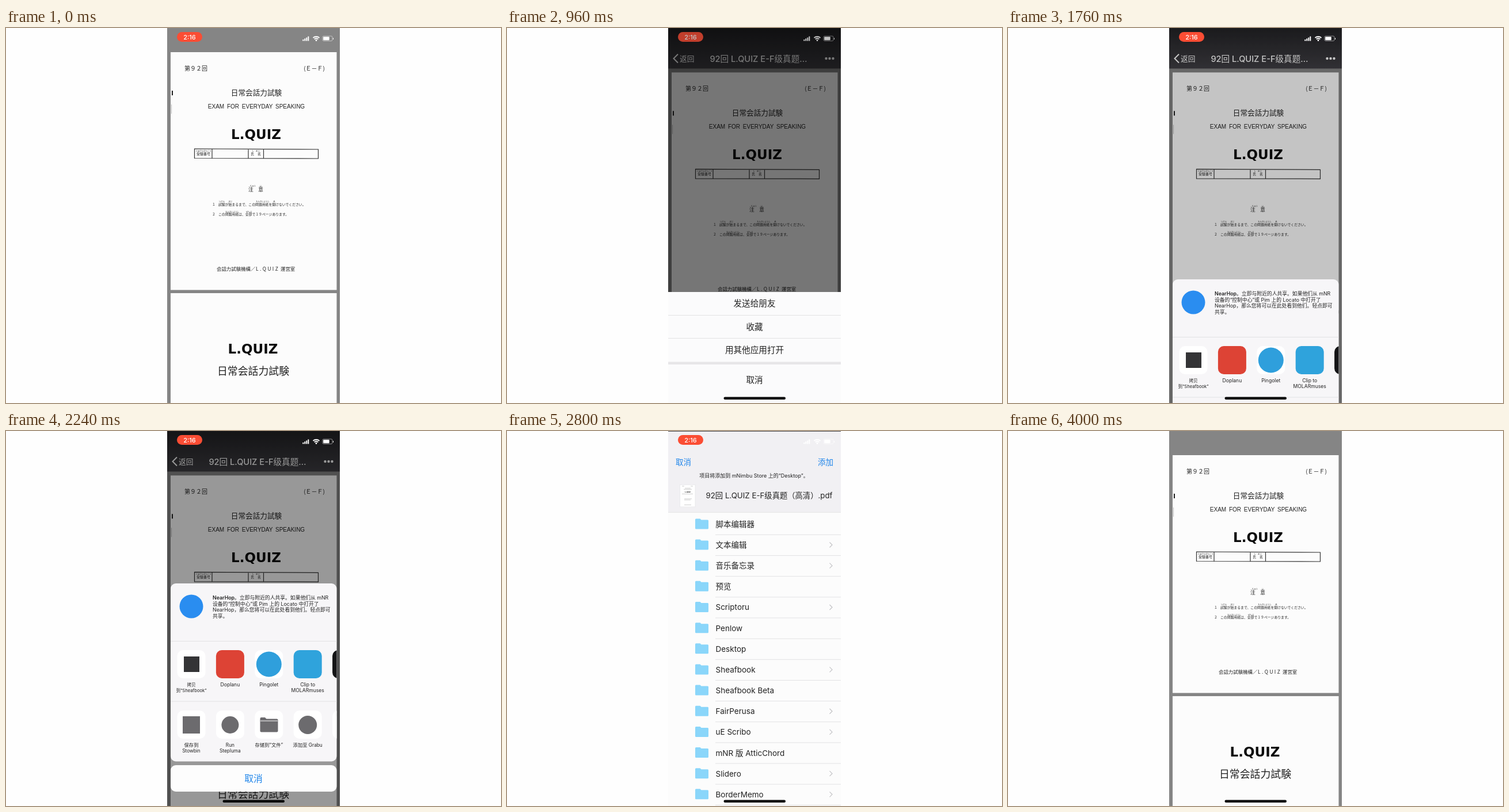
Recreate the animation shown at these times as an HTML page. Size 860x652 px, loop 4080 ms.

```html
<!DOCTYPE html>
<html lang="zh-CN">
<head>
<meta charset="utf-8">
<title>Saving a document</title>
<style>
  html, body { margin: 0; width: 100%; height: 100%; overflow: hidden; background: #fefefe; }
  svg { display: block; font-family: Inter, "Noto Sans CJK SC", "Noto Sans CJK", sans-serif; fill: #222; }
  .jp { font-family: "Noto Sans CJK JP", "Noto Sans CJK", sans-serif; }
  .arial { font-family: "Liberation Sans", sans-serif; word-spacing: 2px; }
  .bold { font-family: "DejaVu Sans", sans-serif; font-weight: bold; fill: #0c0c0c; }
  .mid { text-anchor: middle; }
  .white { fill: #fff; }
  .blue { fill: #1f85ea; }
  .line { stroke: #e2e2e4; stroke-width: 1; }
  .stroke { fill: none; stroke-width: 1.2; }
</style>
</head>
<body>
<svg id="stage" width="860" height="652" viewBox="0 0 860 652">
  <defs>
    <clipPath id="screen"><rect x="280" width="300" height="652"/></clipPath>
    <clipPath id="card"><rect x="286" y="265" width="288.5" height="309.5" rx="9"/></clipPath>
    <linearGradient id="bar" x2="0" y2="1">
      <stop stop-color="#222225"/><stop offset="1" stop-color="#3f3e43"/>
    </linearGradient>
  </defs>
  <g clip-path="url(#screen)">
    <rect x="279" width="302" height="652" fill="#858585"/>
    <g id="doc"></g>
    <g id="nav"></g>
    <rect id="dim" x="279" width="302" height="652" fill="#000"/>
    <g id="menu"></g>
    <g id="share"></g>
    <g id="files"></g>
    <g id="status"></g>
    <rect id="home" x="376.5" y="641.5" width="107.5" height="4.5" rx="2.2" fill="#050505"/>
  </g>
</svg>
<script>
const $ = id => document.getElementById(id);
const text = (x, y, size, str, cls = '', more = '') =>
  `<text x="${x}" y="${y}" font-size="${size}" class="${cls}" ${more}>${str}</text>`;
const rect = (x, y, w, h, fill, rx = 0, more = '') =>
  `<rect x="${x}" y="${y}" width="${w}" height="${h}" fill="${fill}" rx="${rx}" ${more}/>`;
const circle = (x, y, r, fill) => `<circle cx="${x}" cy="${y}" r="${r}" fill="${fill}"/>`;
const line = (x1, y, x2) => `<path class="line" d="M${x1} ${y}H${x2}"/>`;
const path = (d, stroke, more = '') => `<path class="stroke" d="${d}" stroke="${stroke}" ${more}/>`;

function drawDoc() {
  const ruby = [[343, 215, 'じゅけんばんごう'], [434, 215, 'し　めい'], [434, 275.5, 'ちゅう　　い'],
    [375, 303, 'しけん'], [390, 303, 'はじ'], [446, 303, 'もんだいようし'], [466, 303, 'あ'],
    [393, 320.5, 'もんだいようし'], [422, 320.5, 'ぜんぶ']];
  $('doc').innerHTML =
    rect(286, 42, 288.5, 413.5, '#fcfcfc') + rect(286, 461, 288.5, 420, '#fcfcfc') +
    rect(288, 109, 2, 8, '#222') + rect(287, 133, 1, 16, '#bbb') +
    text(310, 73.5, 10, '第９２回', 'jp') +
    text(554, 73.5, 10, '(Ｅ－Ｆ)', 'jp', 'text-anchor="end"') +
    text(435, 116.5, 12.65, '日常会話力試験', 'jp mid') +
    text(435, 139.5, 10, 'EXAM FOR EVERYDAY SPEAKING', 'arial mid') +
    text(434.5, 193, 23, 'L.QUIZ', 'bold mid') +
    path('M327.5 210L542.5 211V227L327.5 226.5ZM358 210V226.5M421 210.5V227M447.5 210.5V227', '#333') +
    text(343, 221, 6, '受験番号', 'jp mid') +
    text(434, 221, 6, '氏　名', 'jp mid') +
    text(434, 284, 8.7, '注　意', 'jp mid') +
    text(358, 308.5, 5.85, '１') + text(369, 308.5, 5.85, '試験が始まるまで、この問題用紙を開けないでください。', 'jp') +
    text(358, 326, 5.85, '２') + text(369, 326, 5.85, 'この問題用紙は、全部で１９ページあります。', 'jp') +
    ruby.map(([x, y, s]) => text(x, y, 3.4, s, 'jp mid')).join('') +
    text(366, 421.8, 8.45, '会話力試験機構／', 'jp') +
    text(434, 421.8, 8.45, 'L.QUIZ', 'jp', 'letter-spacing="2.4"') +
    text(477, 421.8, 8.45, '運営室', 'jp') +
    text(429, 565.5, 23, 'L.QUIZ', 'bold mid') +
    text(429.5, 602.5, 17.9, '日常会話力試験', 'jp mid');
}

function drawNav() {
  $('nav').innerHTML = rect(279, 0, 302, 70.5, 'url(#bar)') +
    path('M297 45.5L289.5 53L297 60.5', '#fff', 'style="stroke-width:2"') +
    text(300, 57.8, 12.7, '返回', 'white') +
    text(437, 58.5, 14.6, '92回 L.QUIZ E-F级真题…', 'white mid', 'font-weight="500"') +
    [554.5, 560.5, 566.5].map(x => circle(x, 53, 2.2, '#fff')).join('');
}

function drawMenu() {
  const items = [['发送给朋友', 479], ['收藏', 519.5], ['用其他应用打开', 560], ['取消', 611.5]];
  $('menu').innerHTML = rect(279, 459, 302, 193, '#fbfbfc') +
    rect(279, 540, 302, 41, '#f0eff1', 0, 'id="press"') + rect(279, 580.5, 302, 4.5, '#e7e6e8') +
    line(279, 499.5, 581) + line(279, 539.5, 581) +
    items.map(([s, y]) => text(430, y + 5.3, 14.6, s, 'mid')).join('');
}

function drawShare() {
  const tileX = i => 322 + 67.4 * i;
  const label = (i, y, lines, size = 8.3) =>
    lines.map((s, n) => text(tileX(i), y + n * 10, size, s, 'mid')).join('');
  const tile = (i, y, fill) => rect(tileX(i) - 24.5, y, 49, 49, fill, 10);
  const folder = 'M441.5 500Q441.5 498 443.5 498H450L452.5 500.5H470.5Q472.5 500.5 472.5 502.5V521.5Q472.5 523.5 470.5 523.5H443.5Q441.5 523.5 441.5 521.5Z';
  const apps = [['拷贝', '到“Sheafbook”'], ['Doplanu'], ['Pingolet'], ['Clip to', 'MOLARmuses']];
  const actions = [['保存到', 'Stowbin'], ['Run', 'Stepluma'], ['存储到“文件”'], ['添加至 Grabu']];
  const about = ['<tspan font-weight="600">NearHop</tspan>。立即与附近的人共享。如果他们从 mNR',
    '设备的“控制中心”或 Pim 上的 Locato 中打开了', 'NearHop，那么您将可以在此处看到他们。轻点即可', '共享。'];
  $('share').innerHTML = '<g clip-path="url(#card)">' + rect(286, 265, 289, 310, '#f7f6f8') +
    circle(322, 305, 20.5, '#2a8df0') +
    about.map((s, i) => text(359, 293 + i * 10.6, 8.8, s)).join('') +
    line(286, 365.5, 575) + line(286, 470, 575) +
    ['#fff', '#dd4335', '#fff', '#2fa3dc', '#141416'].map((c, i) => tile(i, 381, c)).join('') +
    rect(309, 392, 27, 27, '#343436') + circle(tileX(2), 405.5, 22, '#2f9fdc') +
    [0, 1, 2, 3, 4].map(i => tile(i, 486, '#fff')).join('') +
    rect(307, 496, 30, 30, '#6c6b6e') + circle(tileX(1), 511, 15, '#6c6b6e') +
    `<path d="${folder}" fill="#6c6b6e"/>` + path('M442 504H472', '#fff') +
    circle(tileX(3), 511, 16, '#6c6b6e') +
    apps.map((a, i) => label(i, 443.5, a, i ? 8.6 : 7.6)).join('') +
    actions.map((a, i) => label(i, 548.8, a)).join('') + '</g>' +
    rect(286, 581, 288.5, 46, '#fdfdfd', 9) +
    text(430, 609.7, 15.8, '取消', 'blue mid', 'font-weight="500"');
}

function drawFiles() {
  // A leading ">" marks rows that open further.
  const rows = ['脚本编辑器', '>文本编辑', '>音乐备忘录', '预览', '>Scriptoru', 'Penlow', 'Desktop', '>Sheafbook',
    'Sheafbook Beta', '>FairPerusa', '>uE Scribo', 'mNR 版 AtticChord', '>Slidero', '>BorderMemo'];
  const row = (s, i) => {
    const y = 161 + i * 36.15, open = s[0] === '>';
    return `<path d="M327 ${y - 8}q0-1.5 1.5-1.5h7l2 2h11q1.5 0 1.5 1.5v13q0 1.5-1.5 1.5h-20q-1.5 0-1.5-1.5z" fill="#8ad6fa"/>` +
      text(362.5, y + 5, 13.5, open ? s.slice(1) : s) + line(362, y + 18.5, 581) +
      (open ? path(`M560.5 ${y - 4.5}l4.5 4.5l-4.5 4.5`, '#c3c3c6') : '');
  };
  $('files').innerHTML = rect(279, 0, 302, 652, '#fcfcfc') + rect(279, 0, 302, 140, '#f1f0f3') +
    line(279, 140.5, 581) +
    text(293, 58.5, 13.5, '取消', 'blue') + text(540, 58.5, 13.5, '添加', 'blue', 'font-weight="500"') +
    text(429, 80.3, 9, '项目将添加到 mNimbu Store 上的“Desktop”。', 'mid') +
    rect(300.5, 92.5, 26.5, 38.5, '#fff', 0, 'stroke="#e2e2e4" stroke-width=".6"') +
    text(314, 106, 2.6, 'L.QUIZ', 'bold mid') +
    path('M304 95h4M319 95h4M309 98.5h10M307 100.5h14M304 108.5h19M308 117h13M308 119h11M308 127.5h12', '#aaa', 'style="stroke-width:.6"') +
    text(345.5, 115.8, 13.3, '92回 L.QUIZ E-F级真题（高清）.pdf') +
    rows.map(row).join('');
}

function drawStatus() {
  $('status').innerHTML = rect(297, 7, 44, 17, '#fb4d34', 8.5) +
    text(319, 19.5, 11, '2:16', 'white mid', 'font-weight="500"') +
    '<g id="icons">' +
    [0, 1, 2, 3].map(i => rect(515.3 + i * 3, 20 - i * 1.8, 2, 2.5 + i * 1.8, 'currentColor', .5)).join('') +
    path('M533.5 17.2a8 8 0 0 1 11 0M535.7 19.5a5 5 0 0 1 6.6 0', 'currentColor', 'style="stroke-width:1.8"') +
    circle(539, 21.5, 1.4, 'currentColor') +
    path('M552 14h13q2 0 2 2v4.5q0 2-2 2h-13q-2 0-2-2V16q0-2 2-2z', 'currentColor', 'style="stroke-width:.8" opacity=".6"') +
    rect(551.2, 15.2, 10.5, 6, 'currentColor', 1) + rect(568, 17, 1, 3, 'currentColor', .5) + '</g>';
}

[drawDoc, drawNav, drawMenu, drawShare, drawFiles, drawStatus].forEach(draw => draw());

const LOOP = 4080, STEP = 80;
const part = (t, a, b) => Math.min(1, Math.max(0, (t - a) / (b - a)));
const easeOut = (u, n = 2) => 1 - (1 - u) ** n;
const shift = (id, y) => $(id).setAttribute('transform', `translate(0 ${y})`);
const fade = (id, a) => $(id).setAttribute('opacity', a);

function render(t) {
  const leave = easeOut(part(t, 3760, 4000));
  const nav = easeOut(part(t, 400, 720)) * (1 - leave);
  const menu = easeOut(part(t, 800, 960)) * (1 - part(t, 1440, 1600));
  const share = easeOut(part(t, 1600, 2080)) * (1 - part(t, 2240, 2480) ** 1.5);
  const files = easeOut(part(t, 2400, 2850), 3) * (1 - easeOut(part(t, 3200, 3760)));

  shift('doc', 35.3 * nav);
  shift('nav', -71 * (1 - nav));
  fade('dim', .53 * menu + .4 * share);
  shift('menu', 193 * (1 - menu));
  fade('press', t >= 1200 ? 1 : 0);
  shift('share', 387 * (1 - share));
  shift('files', 652 * (1 - files));
  fade('status', (1 - .25 * menu) * (1 - leave));
  const shade = Math.round(255 * (1 - part(t, 2800, 3040) * (1 - part(t, 3280, 3440))));
  $('icons').style.color = `rgb(${shade},${shade},${shade})`;
  fade('home', part(t, 480, 720));
}

function tick() {
  render(Math.floor(performance.now() % LOOP / STEP) * STEP);
  requestAnimationFrame(tick);
}
tick();
</script>
</body>
</html>
```
